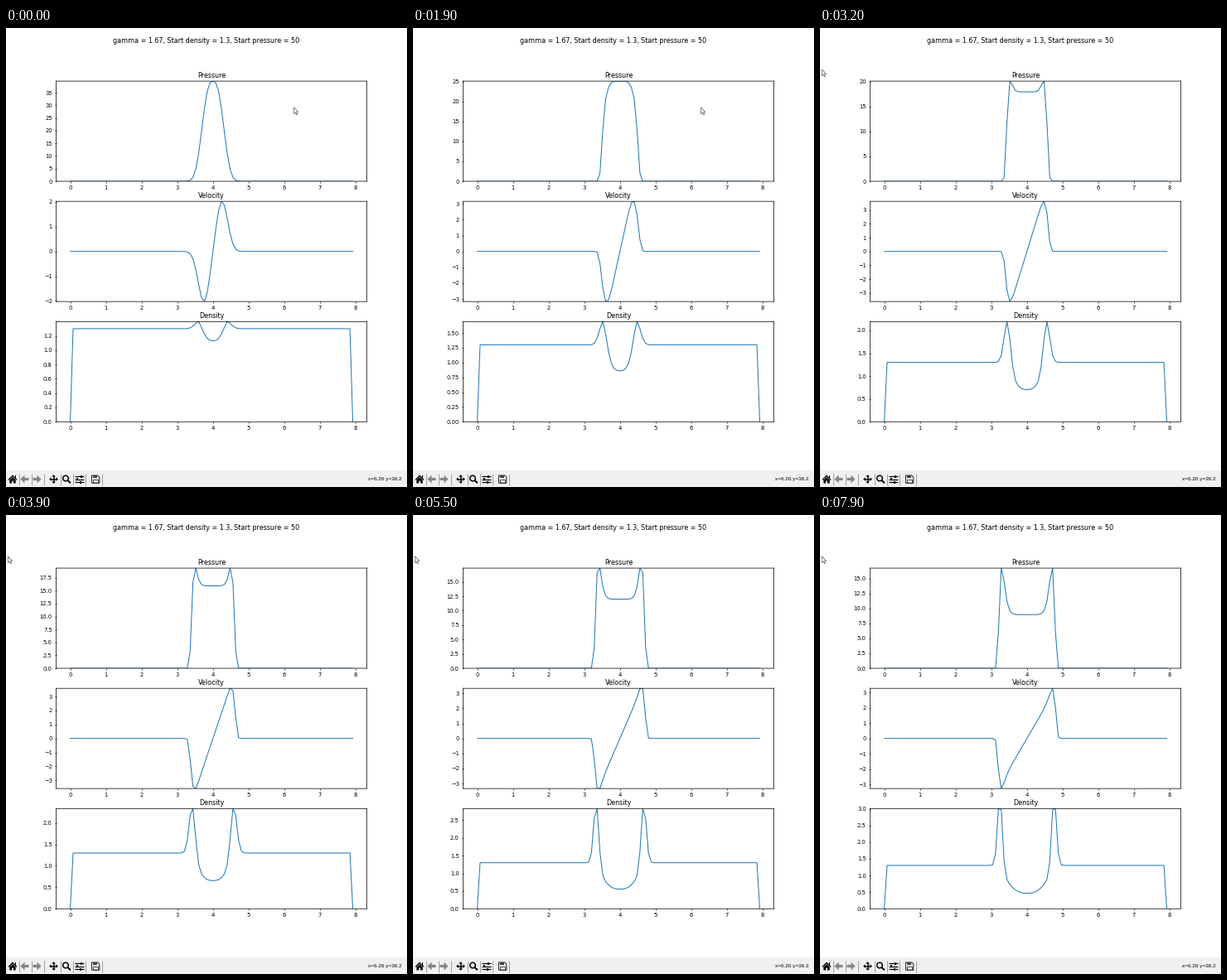
A matplotlib script for the animation above (8000 ms loop, 484 by 554 pixels).

```python
import numpy as np
import matplotlib.pyplot as plt
from matplotlib.animation import FuncAnimation
from matplotlib.patches import Circle, Polygon, Rectangle
from matplotlib.ticker import MaxNLocator

W, H, BAR = 484, 554, 20          # stage and toolbar height in px
DPI = 64
K = 48.4 / DPI                    # scale of the default point sizes
PT = 72 / DPI                     # points per px

plt.rcParams.update({
    "font.family": "DejaVu Sans",
    "font.size": 10 * K,
    "axes.titlepad": 6 * K,
    "axes.linewidth": 1.1 * K,
    "lines.linewidth": 1.5 * K,
})
for side in "xy":
    plt.rcParams.update({
        f"{side}tick.major.size": 3.5 * K,
        f"{side}tick.major.pad": 3.5 * K,
        f"{side}tick.major.width": K,
    })

GAMMA, RHO0, P0 = 1.67, 1.3, 50
DX = 0.08
cell = np.arange(100)
x = cell * DX
sign = np.sign(cell - 50)
dist = np.abs(cell - 50) * DX
PAUSES = [2, 9, 13, 33, 36, 51, 53, 56]   # ticks on which the solver lags


def track(*vals):
    """Cubic in the solver step through four evenly spread values."""
    return np.poly1d(np.polyfit([0, 23, 48, 71], vals, 3))


steepness = track(2.7, 7.5, 11, 14.5)
p_front = track(0.365, 0.485, 0.65, 0.76)
p_ridge = track(0, 1.3, 2.5, 3)
v_slope = track(11.5, 9.3, 5.5, 4)
v_front = track(0.37, 0.52, 0.675, 0.79)
v_ridge = track(0, 0.5, 1, 1)
core = track(1.13, 0.77, 0.553, 0.465)
shell = track(0.39, 0.51, 0.665, 0.758)
shell_width = track(0.17, 0.14, 0.1, 0.092)
shell_height = track(0.1, 0.65, 1.7, 2.1)


def blast(front, ridge, power):
    """1 at the centre, a ridge just behind the front, 0 beyond it."""
    r = dist / front
    return (1 + ridge * r ** 8) * np.exp(-r ** power)


def gas(n):
    """Pressure, velocity and density at solver step n."""
    centre = P0 * (core(n) / RHO0) ** GAMMA      # the core expands adiabatically
    p = centre * blast(p_front(n), p_ridge(n), steepness(n))
    v = sign * v_slope(n) * dist * blast(v_front(n), v_ridge(n), steepness(n))
    rise = np.minimum(dist / shell(n), 1) ** 2.5
    bump = np.exp(-((dist - shell(n)) / shell_width(n)) ** 2)
    rho = core(n) + (RHO0 - core(n)) * rise + shell_height(n) * bump
    rho[[0, -1]] = 0
    return p, v, rho


fig, axes = plt.subplots(3, 1, figsize=(W / DPI, H / DPI), dpi=DPI)
fig.set_facecolor("white")


def canvas_y(f):
    return (BAR + f * (H - BAR)) / H


fig.subplots_adjust(left=0.125, right=0.9, bottom=canvas_y(0.11),
                    top=canvas_y(0.88), hspace=0.2)
fig.suptitle("gamma = 1.67, Start density = 1.3, Start pressure = 50", y=canvas_y(0.98))

lines = []
for ax, name in zip(axes, ("Pressure", "Velocity", "Density")):
    ax.set_title(name)
    ax.set_xlim(-0.05 * x[-1], 1.05 * x[-1])
    ax.yaxis.set_major_locator(MaxNLocator(8, steps=[1, 2, 2.5, 5, 10]))
    for spine in ax.spines.values():
        spine.set_snap(False)
    lines += ax.plot(x, 0 * x, color="#1f77b4")

# Overlay in pixel coordinates for the toolbar and the pointer
ui = fig.add_axes([0, 0, 1, 1], zorder=5)
ui.set_xlim(0, W)
ui.set_ylim(H, 0)
ui.axis("off")


def poly(pts, color="black"):
    ui.add_patch(Polygon(pts, fc=color, lw=0))


def rect(x0, y0, w, h, color="black"):
    ui.add_patch(Rectangle((x0, y0), w, h, fc=color, lw=0))


def stroke(xs, ys, width, color="black"):
    ui.plot(xs, ys, color=color, lw=width * PT, solid_capstyle="butt")


def arrow(cx, way):
    poly([(cx + way * 5, 544.5), (cx, 539.5), (cx, 542.9), (cx - way * 5, 542.9),
          (cx - way * 5, 546.1), (cx, 546.1), (cx, 549.5)], "#858585")


def toolbar():
    rect(0, H - BAR, W, BAR, "#f0f0f0")
    for sx in (15.5, 30.5, 45.5, 65.5, 80.5, 95.5, 115.5):
        stroke([sx, sx], [537.5, 552], 0.8, "#8c8c8c")
    # home
    poly([(2.5, 545), (8, 539.5), (13.5, 545), (12.5, 545.8), (8, 541.5), (3.5, 545.8)])
    poly([(4.3, 545.6), (8, 542.2), (11.7, 545.6), (11.7, 549.5), (9, 549.5),
          (9, 546.6), (7, 546.6), (7, 549.5), (4.3, 549.5)])
    rect(10.6, 540, 1.4, 3)
    arrow(22.5, -1)
    arrow(37.5, 1)
    # pan
    stroke([53.5, 61.5], [544.5, 544.5], 1.5)
    stroke([57.5, 57.5], [540.5, 548.5], 1.5)
    for ux, uy in ((1, 0), (-1, 0), (0, 1), (0, -1)):
        tx, ty = 57.5 + 5.3 * ux, 544.5 + 5.3 * uy
        bx, by = 57.5 + 3 * ux, 544.5 + 3 * uy
        poly([(tx, ty), (bx + 2.3 * uy, by + 2.3 * ux), (bx - 2.3 * uy, by - 2.3 * ux)])
    # zoom
    ui.add_patch(Circle((72, 543.5), 3.3, fc="none", ec="black", lw=1.5 * PT))
    stroke([74.4, 77.8], [545.9, 549.3], 2)
    # sliders
    for sy, knob in ((541, 90.5), (544.5, 85.5), (548, 90)):
        stroke([83, 93.5], [sy, sy], 1.2)
        rect(knob - 1, sy - 1.5, 2, 3)
    # save
    ui.add_patch(Polygon([(103.5, 540), (110.8, 540), (112.8, 542), (112.8, 549.2),
                          (103.5, 549.2)], fc="none", ec="#222222", lw=PT))
    rect(105, 540, 5, 3, "#444444")
    ui.add_patch(Rectangle((105.3, 545.3), 5.6, 3.9, fc="none", ec="#222222", lw=0.8 * PT))
    ui.text(477.5, 544.8, "x=6.26 y=36.2", ha="right", va="center",
            family="Liberation Sans", size=6.4 * PT)


toolbar()

SHAPE = np.array([(0, 0), (0, 7.8), (1.8, 6.2), (3, 9), (4.2, 8.5), (3.1, 5.9), (5.3, 5.8)])
pointer = ui.add_patch(Polygon(SHAPE, fc="white", ec="#555555", lw=0.7 * PT))


def draw(tick):
    step = tick - sum(p <= tick for p in PAUSES)
    data = gas(step)
    for ax, line, y in zip(axes, lines, data):
        line.set_ydata(y)
        ax.set_ylim(y.min(), y.max())
    pointer.set_visible(tick < 23 or tick >= 32)
    pointer.set_xy(SHAPE + ((347.5, 95.8) if tick < 23 else (2.3, 49.8)))
    return lines + [pointer]


anim = FuncAnimation(fig, draw, frames=80, interval=100, repeat=True)
plt.show()
```
